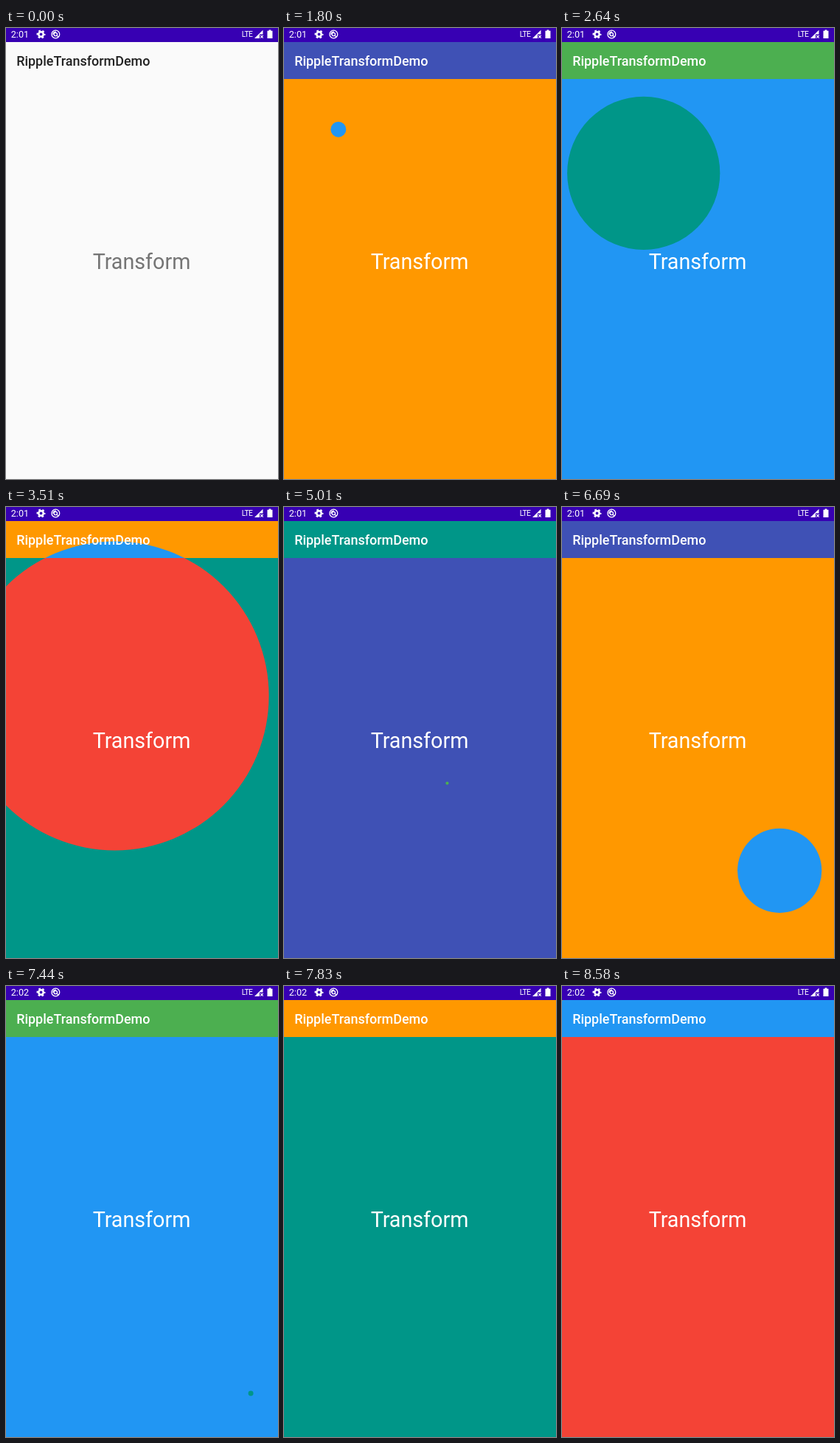
An HTML page for the animation above (8.85 s loop, 369 by 610 pixels).

```html
<!DOCTYPE html>
<html lang="en">
<head>
<meta charset="utf-8">
<title>Ripple transform</title>
<style>
  html, body { margin: 0; width: 100%; height: 100%; overflow: hidden; background: #fafafa; }
  svg { display: block; width: 369px; height: 610px; font-family: Roboto, sans-serif; }
  .title { font-size: 17.95px; font-weight: 500; }
  .label { font-size: 28.7px; text-anchor: middle; }
</style>
</head>
<body>
<svg viewBox="0 0 369 610">
  <defs>
    <clipPath id="reveal"><circle id="ripple"/></clipPath>
  </defs>

  <g id="under">
    <rect class="body" y="69" width="369" height="541"/>
    <rect class="bar" y="19" width="369" height="50"/>
    <text class="title" x="14.2" y="51">RippleTransformDemo</text>
    <text class="label" x="184" y="326">Transform</text>
  </g>
  <g id="over" clip-path="url(#reveal)"></g>

  <!-- status bar -->
  <rect width="369" height="19" fill="#3700b3"/>
  <g fill="#fff">
    <text id="clock" x="6.8" y="13.3" font-size="12.6">2:01</text>
    <g transform="translate(47.5 8.5)">
      <circle r="3.2" fill="none" stroke="#fff" stroke-width="2.6"/>
      <circle r="5" fill="none" stroke="#fff" stroke-width="2" stroke-dasharray="2.6 2.636" stroke-dashoffset="1.3"/>
    </g>
    <g transform="translate(67.3 8.5)" fill="none" stroke="#fff" stroke-width="1.3">
      <circle r="5.4"/>
      <circle r="2.2"/>
      <path d="M1.4 1.4L3.6 3.6M-3.4 .6A3.5 3.5 0 0 1 .6 -3.4"/>
    </g>
    <text x="319.8" y="12.3" font-size="10.4" letter-spacing="-.6">LTE</text>
    <path d="M337 14L348.5 2.8V8.6H344V14Z"/>
    <path d="M345.2 10L348.8 13.6M348.8 10L345.2 13.6" stroke="#fff" stroke-width="1.1"/>
    <path d="M356.6 2.6h2.8v1.2h2.1v10.2h-7V3.8h2.1z"/>
  </g>
</svg>
<script>
  const LOOP = 8850, STEP = 30, REVEAL = 400;
  const W = 369, H = 610, TOP = 19;
  const CLOCK_TICK = 6840;
  const orange = '#ff9800', blue = '#2196f3', teal = '#009688',
        red = '#f44336', indigo = '#3f51b5', green = '#4caf50';
  const palette = [orange, blue, teal, red, indigo, green];

  // Moment at which each ripple begins to grow
  const starts = [1020, 1765, 2518, 3310, 4138, 4992, 5779, 6607, 7421, 8188];

  const $ = id => document.getElementById(id);
  const under = $('under'), over = $('over'), ripple = $('ripple');
  over.innerHTML = under.innerHTML;

  const ease = x => (1 - Math.cos(Math.PI * x)) / 2;

  // Look of the page after n ripples; the bar trails the body by two colours
  function look(n) {
    if (!n) return { body: '#fafafa', bar: '#fafafa', title: '#212121', label: '#757575' };
    return { body: palette[(n - 1) % 6], bar: palette[(n + 3) % 6], title: '#fff', label: '#fff' };
  }

  function paint(layer, n) {
    const colors = look(n);
    for (const part in colors) layer.querySelector('.' + part).setAttribute('fill', colors[part]);
  }

  function draw(time) {
    const t = Math.floor(time % LOOP / STEP) * STEP;
    const n = starts.filter(s => s < t).length;
    const progress = n ? Math.min((t - starts[n - 1]) / REVEAL, 1) : 1;

    // Centres walk down the diagonal of the area below the status bar
    const x = W * n / 10, y = TOP + (H - TOP) * n / 10;
    const reach = Math.hypot(Math.max(x, W - x), Math.max(y - TOP, H - y));
    const radius = progress < 1 ? reach * ease(progress) : 2 * H;

    paint(under, Math.max(n - 1, 0));
    paint(over, n);
    ripple.setAttribute('cx', x);
    ripple.setAttribute('cy', y);
    ripple.setAttribute('r', radius);
    $('clock').textContent = t < CLOCK_TICK ? '2:01' : '2:02';
  }

  const begin = performance.now();
  function tick() {
    draw(performance.now() - begin);
    requestAnimationFrame(tick);
  }
  tick();
</script>
</body>
</html>
```
